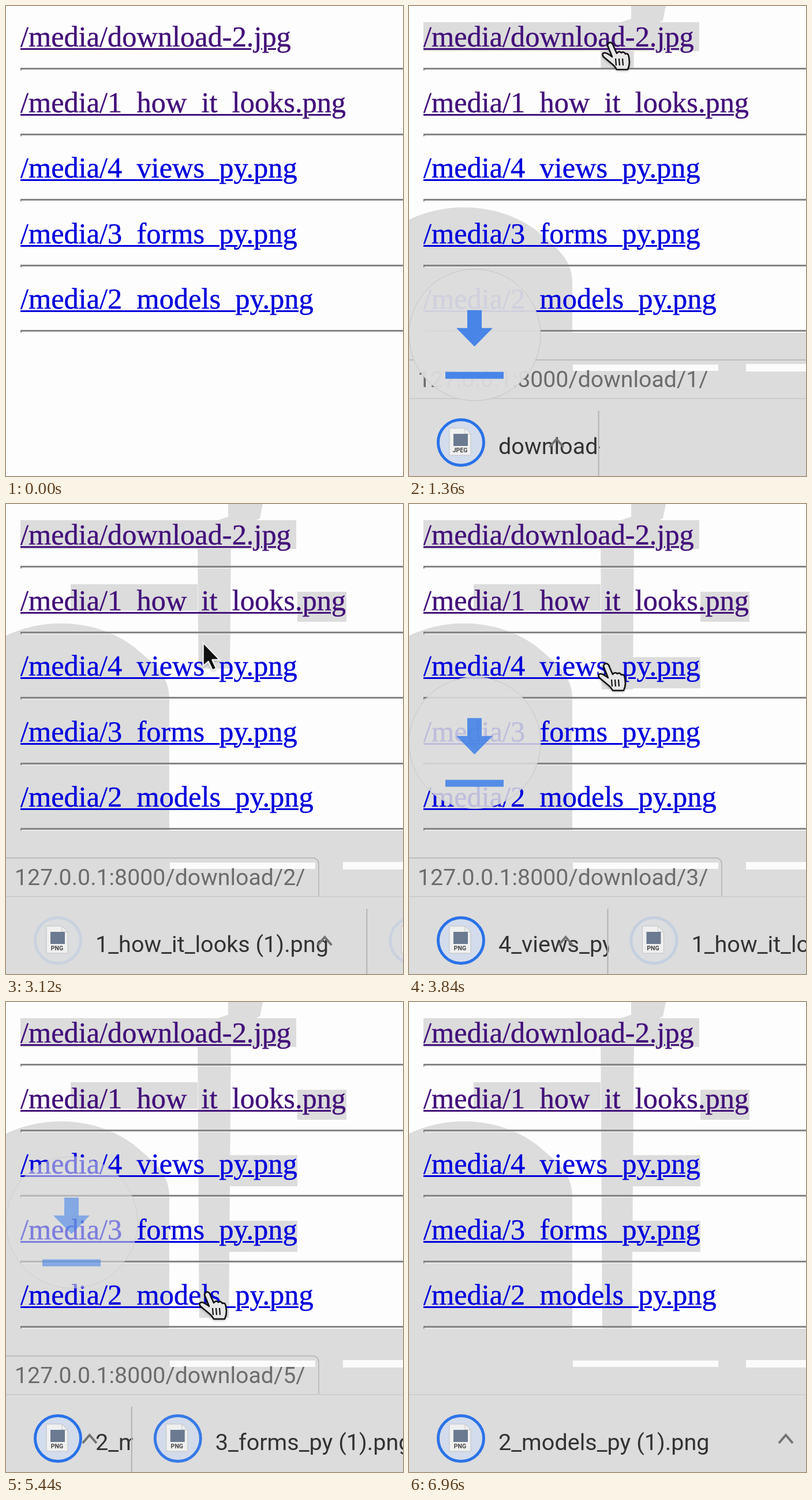
Write an HTML page with a canvas that moves like this. It is 688x814 px and loops after 7040 ms.

```html
<!DOCTYPE html>
<html lang="en">
<head>
<meta charset="utf-8">
<style>
html, body { margin: 0; width: 688px; height: 814px; overflow: hidden; background: #fdfdfd; }
canvas, #page { position: absolute; left: 0; top: 0; width: 688px; height: 814px; overflow: hidden; }
.row { position: absolute; left: 25px; font: 50.4px/60px "Liberation Serif", serif; white-space: pre;
  color: #0000dc; -webkit-text-stroke: .4px; text-decoration: underline;
  text-decoration-thickness: 2.8px; text-underline-offset: 2.6px; }
.visited { color: #43107a; }
.rule { position: absolute; left: 25px; right: 0; height: 1px; border: solid;
  border-width: 3px 0 1px 2px; border-color: #858585 #eee #eee #858585; }
</style>
</head>
<body>
<canvas id="back" width="688" height="814"></canvas>
<div id="page"></div>
<canvas id="front" width="688" height="814"></canvas>
<script>
const LOOP = 7040, STEP = 80, W = 688, H = 814, PITCH = 113.6, GREY = '#dcdcdc', BLUE = '#3f80e8';
const files = ['download-2.jpg', '1_how_it_looks.png', '4_views_py.png', '3_forms_py.png', '2_models_py.png'];
const clicks = [988, 2480, 3426, 4211, 4942];    // rising badge starts
const starts = [1156, 2620, 3624, 4433, 5314];   // shelf item starts
const arrivals = [850, 2150, 3250, 4130, 4880];
const path = [[400, 415, -60], [850, 347, 63], [1500, 347, 63], [2150, 345, 160], [2900, 345, 160],
  [3250, 340, 276], [3860, 340, 276], [4130, 351, 383], [4660, 351, 383], [4880, 347, 502],
  [5650, 347, 502], [6100, 358, 840]];

const back = document.getElementById('back').getContext('2d');
const front = document.getElementById('front').getContext('2d');
const clamp = v => Math.max(0, Math.min(1, v));
const ramp = (t, t0, t1, a, b) => a + (b - a) * clamp((t - t0) / (t1 - t0));
const smooth = v => v * v * (3 - 2 * v);

// An underscore is as wide as two spaces and merges with the underline.
files.forEach((name, i) => {
  const row = document.createElement('div'), rule = document.createElement('div');
  row.className = i < 2 ? 'row visited' : 'row';
  row.textContent = '/media/' + name.replace(/_/g, '\u00a0\u00a0');
  row.style.top = 23 + PITCH * i + 'px';
  rule.className = 'rule';
  rule.style.top = 107 + PITCH * i + 'px';
  document.getElementById('page').append(row, rule);
});

function line(c, x0, y0, x1, y1, color, width = 1.5) {
  c.strokeStyle = color;
  c.lineWidth = width;
  c.beginPath();
  c.moveTo(x0, y0);
  c.lineTo(x1, y1);
  c.stroke();
}

function box(c, x, y, w, h, color) {
  c.fillStyle = color;
  c.fillRect(x, y, w, h);
}

function text(c, s, x, y, font, color) {
  c.font = font;
  c.fillStyle = color;
  c.fillText(s, x, y);
}

function pointer(t) {
  if (t < path[0][0] || t > path[path.length - 1][0]) return null;
  const i = path.findIndex(p => p[0] >= t) || 1;
  const [t0, x0, y0] = path[i - 1], [t1, x1, y1] = path[i];
  const k = smooth((t - t0) / (t1 - t0));
  return { x: x0 + (x1 - x0) * k, y: y0 + (y1 - y0) * k };
}

const trail = new Path2D('M385 0H445L440 25L390 50L386 570H335L332 40L385 22Z');

function drawBack(t, cur) {
  const c = back;
  c.clearRect(0, 0, W, H);
  const reach = t > 6100 ? 570 : cur ? Math.min(cur.y + 45, 570) : 0;
  c.fillStyle = GREY;
  if (reach > 0) {
    c.save();
    c.beginPath();
    c.rect(0, 0, W, reach);
    c.clip();
    c.fill(trail);
    c.restore();
  }
  if (t > arrivals[0]) box(c, 25, 28, 478, 50, GREY);
  if (t > clicks[1]) {
    box(c, 112, 139, 220, 46, GREY);
    box(c, 505, 152, 85, 52, GREY);
  }
  for (let i = 2; i < 4; i++)
    if (t > arrivals[i]) box(c, 372, 38 + PITCH * i, 133, 54, GREY);
  if (t < starts[0]) return;
  box(c, 0, 566, W, H - 566, GREY);
  const top = t < clicks[1] + 1 ? ramp(t, 1200, 1360, 560, 348) : ramp(t, 2600, 2900, 348, 206);
  c.beginPath();
  c.moveTo(0, top + 22);
  c.bezierCurveTo(70, top - 12, 160, top - 5, 220, top + 40);
  c.bezierCurveTo(255, top + 70, 283, top + 90, 283, top + 130);
  c.lineTo(283, 570);
  c.lineTo(0, 570);
  c.fill();
}

function drawStatus(c, y, wide) {
  const right = wide ? W + 20 : 542;
  c.beginPath();
  c.roundRect(-5, y - 67, right + 5, 67, [0, 10, 0, 0]);
  c.fillStyle = GREY;
  c.fill();
  c.strokeStyle = '#b2b2b2';
  c.lineWidth = 1.5;
  c.stroke();
  line(c, 0, y + 1, right, y + 1, '#aeb0b6', 2);
}

// The ring is solid at first, then pulses.
function ringGlow(age) {
  return (Math.cos(Math.max(0, age - 210) / 730 * 2 * Math.PI) + 1) / 2;
}

function drawItem(c, i, x, width, age) {
  c.save();
  c.beginPath();
  c.rect(x, 682, width + 12, 140);
  c.clip();
  c.translate(x, 0);
  c.globalAlpha = age < 2000 ? ringGlow(age) : 0;
  c.beginPath();
  c.arc(90, 756, 39.5, 0, 7);
  c.fillStyle = '#d3dcec';
  c.fill();
  c.strokeStyle = '#2a72e8';
  c.lineWidth = 5;
  c.stroke();
  c.globalAlpha = 1;

  c.beginPath();
  c.moveTo(70, 731); c.lineTo(97, 731); c.lineTo(107, 741); c.lineTo(107, 778); c.lineTo(70, 778);
  c.closePath();
  c.fillStyle = '#f0f0f0';
  c.fill();
  c.strokeStyle = '#c2c2c2';
  c.lineWidth = 1;
  c.stroke();
  line(c, 97, 731, 97, 741, '#c2c2c2', 1);
  line(c, 97, 741, 107, 741, '#c2c2c2', 1);
  box(c, 77, 741, 25, 21, '#6b7a90');
  c.textAlign = 'center';
  text(c, i ? 'PNG' : 'JPEG', 88.5, 773, 'bold 10.5px Roboto, sans-serif', '#444');
  c.textAlign = 'left';

  text(c, files[i].replace('.', ' (1).'), 155, 776, '39.6px Roboto, sans-serif', '#333');
  const cx = width - 63;
  c.beginPath();
  c.moveTo(cx - 12, 764); c.lineTo(cx, 750); c.lineTo(cx + 12, 764);
  c.strokeStyle = '#737373';
  c.lineWidth = 4;
  c.stroke();
  c.restore();
  line(c, x + width + 10, 701, x + width + 10, H, '#b3b3b3', 2);
}

function drawShelf(c, t, y) {
  box(c, 0, y, W, H, GREY);
  line(c, 0, y, W, y, '#cccccc');
  let x = 0;
  c.save();
  c.translate(0, y - 680);
  for (let i = starts.length - 1; i >= 0; i--) {
    const age = t - starts[i];
    if (age < 0 || x > W) continue;
    const k = clamp(age / 800), width = 716 * (1 - (1 - k) ** 2);
    drawItem(c, i, x, width, age);
    x += width;
  }
  c.restore();
}

function drawBadge(c, v, bottom) {
  const y = bottom - 228 * v - 114;
  c.save();
  c.globalAlpha = 1 - (v - .5) ** 2 * 4;
  c.beginPath();
  c.arc(114, y, 114, 0, 7);
  c.fillStyle = '#dedede';
  c.fill();
  c.strokeStyle = '#c2c2c2';
  c.lineWidth = 1;
  c.stroke();
  c.fillStyle = BLUE;
  c.beginPath();
  c.moveTo(101, y - 43); c.lineTo(126, y - 43); c.lineTo(126, y - 12); c.lineTo(145, y - 12);
  c.lineTo(113.5, y + 20); c.lineTo(82, y - 12); c.lineTo(101, y - 12);
  c.fill();
  c.fillRect(63, y + 64, 101, 12);
  c.restore();
}

const hand = new Path2D('M-3 5Q-1 -2 4 1Q7 3 8 8L13 19Q17 14 21 18Q25 15 28 20Q33 18 34 25' +
  'L35 34Q35 41 32 47L13 47Q10 41 2 35L-10 25Q-14 19 -8 18Q-4 18 5 25Z');
const arrow = new Path2D('M0 0L0 41L9 33L16 48L23 45L16 30L29 30Z');

function drawPointer(c, cur, onLink) {
  const shape = onLink ? hand : arrow;
  c.save();
  c.translate(cur.x, cur.y);
  c.lineJoin = 'round';
  c.shadowColor = 'rgba(0,0,0,.35)';
  c.shadowBlur = 4;
  c.shadowOffsetY = 2;
  c.fillStyle = onLink ? '#e6e6e6' : '#111';
  c.strokeStyle = onLink ? '#111' : '#eee';
  c.lineWidth = 2.6;
  c.fill(shape);
  c.shadowColor = 'transparent';
  c.stroke(shape);
  if (onLink) for (let x = 11; x < 26; x += 6) line(c, x, 28, x + 1, 40, '#111', 2.2);
  c.restore();
}

function draw(t) {
  const c = front, cur = pointer(t);
  drawBack(t, cur);
  c.clearRect(0, 0, W, H);
  const shelfY = ramp(t, starts[0], starts[0] + 120, 825, 680);
  const row = cur ? Math.floor((cur.y - 15) / PITCH) : -1;
  const onLink = row >= 0 && row < 5 && cur.y - 15 - row * PITCH < 70;
  const id = t < 5850 ? arrivals.filter(a => t >= a - 60).length : 0;

  if (id) drawStatus(c, shelfY, t < 1500);
  if (shelfY === 680) {
    box(c, 284, 621, 252, 11, '#fbfbfb');
    box(c, 584, 620, 104, 13, '#fbfbfb');
  }
  if (id) text(c, `127.0.0.1:8000/download/${id}/`, 15, shelfY - 20, '39.3px Roboto, sans-serif', '#6c6c6c');
  if (t >= starts[0]) drawShelf(c, t, shelfY);
  clicks.forEach((start, i) => {
    const v = (t - start) / 600;
    if (v > 0 && v < 1) drawBadge(c, v, i ? 685 : 825);
  });
  if (cur) drawPointer(c, cur, onLink);
}

const began = performance.now();
function tick() {
  // The picture advances in even steps; the small lead absorbs timer jitter.
  const t = (performance.now() - began + 8) % LOOP;
  draw(Math.floor(t / STEP) * STEP);
  requestAnimationFrame(tick);
}
tick();
</script>
</body>
</html>
```
